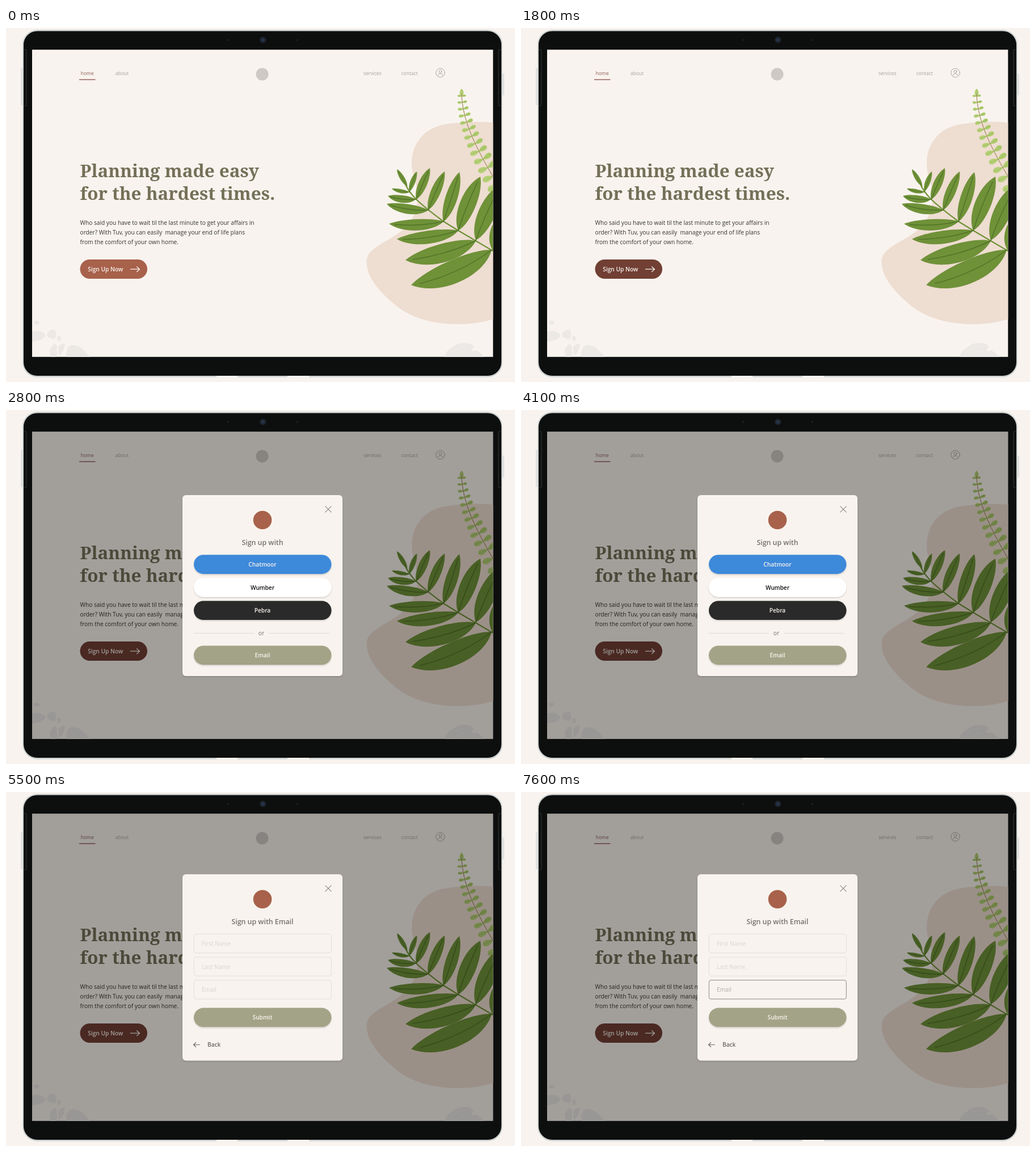
An HTML page for the animation above (8000 ms loop, 897 px wide and 624 px high).

```html
<!DOCTYPE html>
<html lang="en">
<head>
<meta charset="utf-8">
<title>Sign-up flow</title>
<style>
  html, body { margin: 0; width: 100%; height: 100%; overflow: hidden; background: #f8f3ee; }
  svg { display: block; }
  text { font-family: "Open Sans", sans-serif; font-size: 10.17px; white-space: pre; }
  .nav text { font-size: 8.5px; fill: #a5a19e; }
  .head text { font: 700 31.35px "Noto Serif", serif; fill: #737058; }
  .copy text { fill: #35332f; }
  .semi { font-weight: 600; }
  .title { font-size: 12.35px; font-weight: 600; fill: #73706d; }
  .mid { text-anchor: middle; }
  .line { fill: none; stroke-linecap: round; stroke-linejoin: round; }
  .field rect { fill: none; stroke: #e3deda; }
  .field text { fill: #d9d4d0; }
  .field.on rect { stroke: #8a8681; }
  .field.on text { fill: #b0aba7; }
</style>
</head>
<body>
<svg id="stage" width="897" height="624" viewBox="0 0 897 624">
  <defs>
    <clipPath id="screen"><rect x="46" y="38.3" width="812.3" height="541.5"/></clipPath>
    <filter id="soft" x="-10%" y="-20%" width="120%" height="150%">
      <feDropShadow dx="0" dy="1.5" stdDeviation="1.2" flood-opacity=".18"/>
    </filter>
  </defs>
  <rect width="897" height="624" fill="#f8f3ee"/>

  <!-- tablet -->
  <g fill="#e0e3e1">
    <rect x="26" y="70" width="5" height="66" rx="2"/>
    <rect x="873" y="80" width="5" height="39" rx="2"/>
    <rect x="29.2" y="3.2" width="845.6" height="612.3" rx="26" fill="#ccd2d1"/>
    <path d="M371 613h37v3h-37zM496 613h38v3h-38z" fill="#f8f3ee"/>
  </g>
  <rect x="31" y="5.5" width="842" height="607.5" rx="24" fill="#0d0e0e"/>
  <g class="line" stroke="#34383a" stroke-width="1">
    <path d="M32 38h2.5q1.5 0 1.5 2v95q0 2-1.5 2H32M872 38h-2.5q-1.5 0-1.5 2v95q0 2 1.5 2H872"/>
  </g>
  <circle cx="452.8" cy="21" r="5.8" fill="#1d232a"/>
  <circle cx="452.8" cy="21" r="3" fill="#26344a"/>
  <circle cx="391.5" cy="21.3" r="1.8" fill="#1d2022"/>
  <circle cx="513.5" cy="21.3" r="1.8" fill="#1d2022"/>

  <g clip-path="url(#screen)">
    <rect x="46" y="38" width="813" height="542" fill="#f8f3ee"/>
    <g fill="#ebe8e5">
      <path d="M49 518q4-4 9-1l1 3-4 3-5-1z"/>
      <path d="M46 535q9-3 15 0 9 3 8 8-6 8-15 8l-8 2z"/>
      <path d="M72 539l5-6 9-1q3 6 2 12l-3 5-11-4z"/>
      <path d="M90 545q3-4 6-1 2 4 0 7l-5 1z"/>
      <path d="M77 568q4-10 10-11 4 3 2 10l2 5-3 9h-9z"/>
      <path d="M92 563q4-7 12-7l-2 11-5 8-4 3z"/>
      <path d="M106 575q1-14 9-16 14-1 23 10l11 12h-41z"/>
      <path d="M773 580q2-11 12-16 8-9 24-9 12 1 16 7-6 5-4 8 8-4 14 2l8 8z"/>
    </g>
    <path class="line" d="M784 571q12-10 26-10M794 576q10-8 20-8" stroke="#f3efeb" stroke-width="1"/>
    <path fill="#eeddd1" d="M859 167C832 164 792 166 768 171C735 179 715 205 715 239C715 262 726 275 725 300
      C724 340 700 358 674 373C646 389 635 397 635.5 414C636 436 653 460 681 484C711 511 749 522 799 522
      C822 522 842 518 859 513Z"/>
    <g id="fern"></g>
    <g id="palm"></g>

    <g class="nav">
      <text x="131.7" y="82.5" style="fill:#90605c">home</text>
      <text x="192.8" y="82.5">about</text>
      <text x="630" y="82.5">services</text>
      <text x="696.5" y="82.5">contact</text>
    </g>
    <path d="M129 91h28.5" stroke="#98605b" stroke-width="1.4"/>
    <circle cx="451.5" cy="81.5" r="11" fill="#cec9c4"/>
    <g class="line" stroke="#a5a19e" stroke-width=".9">
      <circle cx="765.5" cy="79" r="7.8"/>
      <circle cx="765.5" cy="76.8" r="2.4"/>
      <path d="M761.2 83.5q.4-3 4.3-3t4.3 3"/>
    </g>

    <g class="head">
      <text x="130.5" y="262.6">Planning made easy</text>
      <text x="130.5" y="303.2">for the hardest times.</text>
    </g>
    <g class="copy">
      <text x="130.5" y="347">Who said you have to wait til the last minute to get your affairs in</text>
      <text x="130.5" y="364">order? With Tuv, you can easily&#160; manage your end of life plans</text>
      <text x="130.5" y="381">from the comfort of your own home.</text>
    </g>
    <rect id="cta" x="130.5" y="408" width="118.5" height="34" rx="17"/>
    <text class="semi" x="144.3" y="429" fill="#f8f3ee">Sign Up Now</text>
    <path class="line" d="M219.5 425.2h16M230.5 420.7l5 4.5-5 4.5" stroke="#f8f3ee" stroke-width="1.2"/>

    <rect id="shade" x="46" y="38" width="813" height="542" opacity=".35"/>
    <g id="choice"></g>
    <g id="form"></g>
  </g>
</svg>
<script>
const $ = id => document.getElementById(id);
const NS = 'http://www.w3.org/2000/svg';

function add(parent, tag, attrs, label) {
  const el = document.createElementNS(NS, tag);
  for (const k in attrs) el.setAttribute(k, attrs[k]);
  if (label) el.textContent = label;
  return parent.appendChild(el);
}

// Leaf from base to tip; a and b are how far its two edges bulge from the chord,
// k1 and k2 where along the chord the edges are pulled.
function leaf(parent, [bx, by, tx, ty, a, b], fill, rib, ribWidth, k1 = .2, k2 = .76) {
  const dx = tx - bx, dy = ty - by, len = Math.hypot(dx, dy);
  const at = (k, off) => `${bx + dx * k - dy / len * off},${by + dy * k + dx / len * off}`;
  const up = a / .75, down = -b / .75, mid = (up + down) / 2;
  add(parent, 'path', {
    fill,
    d: `M${bx},${by}C${at(k1, up)} ${at(k2, up)} ${tx},${ty}
        C${at(k2, down)} ${at(k1, down)} ${bx},${by}Z`
  });
  add(parent, 'path', {
    class: 'line', stroke: rib, 'stroke-width': ribWidth,
    d: `M${bx},${by}C${at(.3, mid)} ${at(.6, mid)} ${at(.9, mid * .35)}`
  });
}

function drawFern() {
  const g = $('fern'), p = [[803, 116], [804, 160], [824, 205], [862, 268]];
  const mix = (t, i) => {
    const u = 1 - t;
    return u * u * u * p[0][i] + 3 * u * u * t * p[1][i] + 3 * u * t * t * p[2][i] + t * t * t * p[3][i];
  };
  leaf(g, [803, 121, 803, 107, 3.5, 3.5], '#b5d077', '#9dbb5c', .6);
  for (let k = 0; k < 13; k++) {
    const t = .03 + k * .085, x = mix(t, 0), y = mix(t, 1);
    const slope = Math.atan2(mix(t + .01, 1) - y, mix(t + .01, 0) - x);
    const len = 7 + 13 * t;
    for (const s of [-1, 1]) {
      const a = slope + s * (Math.PI / 2 + .12);
      leaf(g, [x, y, x + Math.cos(a) * len, y + Math.sin(a) * len, len * .27, len * .27],
        s > 0 ? '#b5d077' : '#aecb6e', '#92b353', .7, .4, .95);
    }
  }
  add(g, 'path', { class: 'line', stroke: '#a3915f', 'stroke-width': 1.3, d: `M${p[0]}C${p[1]} ${p[2]} ${p[3]}` });
}

function drawPalm() {
  const g = $('palm');
  add(g, 'path', {
    class: 'line', stroke: '#6f9237', 'stroke-width': 2.2,
    d: 'M704 276Q710 289 723 302T771 341L797 357L860 394'
  });
  const leaves = [
    [707, 279, 689, 249, 4, 4],
    [711, 289, 680, 283, 2, 5], [711, 288, 724, 253, 4, 5],
    [722, 302, 673, 296, 4, 9], [723, 302, 747, 247, 7, 8],
    [744, 321, 671, 310, 5, 12], [744, 321, 773, 253, 8, 9],
    [771, 341, 675, 345, 6, 14], [771, 341, 799, 254, 11, 10],
    [797, 357, 689, 372, 7, 16], [797, 357, 836, 262, 12, 16],
    [828, 375, 704, 409, 11, 22], [828, 374, 873, 275, 13, 17],
    [856, 391, 714, 453, 12, 29], [858, 392, 888, 320, 12, 18]
  ];
  for (const l of leaves) leaf(g, l, '#6f9138', '#4f7327', l[5] > 7 ? 1.4 : .8);
}

function panel(g, y, h, title) {
  add(g, 'rect', { x: 311, y, width: 282, height: h, rx: 6, fill: '#f8f3ee', filter: 'url(#soft)' });
  add(g, 'path', {
    class: 'line', stroke: '#8a8681', 'stroke-width': 1.1,
    d: `M562.7 ${y + 19.8}l10.4 10.4m0-10.4l-10.4 10.4`
  });
  add(g, 'circle', { cx: 452, cy: y + 44, r: 16.3, fill: '#a8614b' });
  add(g, 'text', { class: 'title mid', x: 452, y: y + 87.7 }, title);
}

function pill(g, y, fill, color, label) {
  add(g, 'rect', { x: 331, y, width: 242.5, height: 33.6, rx: 16.8, fill, filter: 'url(#soft)' });
  add(g, 'text', { class: 'semi mid', x: 452, y: y + 20.6, fill: color }, label);
}

function drawChoice() {
  const g = $('choice');
  panel(g, 150, 319, 'Sign up with');
  pill(g, 255.3, '#3e89da', '#f8f3ee', 'Chatmoor');
  pill(g, 295.9, '#ffffff', '#111111', 'Wumber');
  pill(g, 336.5, '#2b2b2b', '#f8f3ee', 'Pebra');
  add(g, 'path', { d: 'M331 393.5h105M463 393.5h107', stroke: '#e0d9d3', 'stroke-width': 1 });
  add(g, 'text', { class: 'mid', x: 450, y: 396.8, fill: '#73706d' }, 'or');
  pill(g, 415.5, '#a3a387', '#f8f3ee', 'Email');
}

function drawForm() {
  const g = $('form');
  panel(g, 145, 328.5, 'Sign up with Email');
  const fields = ['First Name', 'Last Name', 'Email'].map((label, i) => {
    const f = add(g, 'g', { class: 'field' }), y = 250.5 + i * 40.6;
    add(f, 'rect', { x: 331.3, y, width: 242, height: 33.2, rx: 3.5 });
    add(f, 'text', { x: 345, y: y + 20.5 }, label);
    return f;
  });
  pill(g, 380.6, '#a3a387', '#f8f3ee', 'Submit');
  add(g, 'path', {
    class: 'line', stroke: '#6b6864', 'stroke-width': 1.2,
    d: 'M341.5 445.5h-11m4-3.8l-4 3.8 4 3.8'
  });
  add(g, 'text', { class: 'semi', x: 355, y: 449.3, fill: '#6b6864' }, 'Back');
  return fields;
}

drawFern();
drawPalm();
drawChoice();
const fields = drawForm();

// start time, button pressed, open panel, focused field
const steps = [
  [0, false, '', -1],
  [1800, true, '', -1],
  [2800, true, 'choice', -1],
  [5500, true, 'form', -1],
  [6500, true, 'form', 0],
  [7500, true, 'form', 1],
  [7600, true, 'form', 2]
];
const LOOP = 8000;

function render(time) {
  const [, pressed, open, focus] = steps.findLast(s => s[0] <= time);
  const show = (id, on) => $(id).setAttribute('visibility', on ? 'visible' : 'hidden');
  $('cta').setAttribute('fill', pressed ? '#713f34' : '#a8614b');
  show('shade', open);
  show('choice', open === 'choice');
  show('form', open === 'form');
  fields.forEach((f, i) => f.classList.toggle('on', i === focus));
}

const start = performance.now();
function tick() {
  render((performance.now() - start) % LOOP);
  requestAnimationFrame(tick);
}
tick();
</script>
</body>
</html>
```
